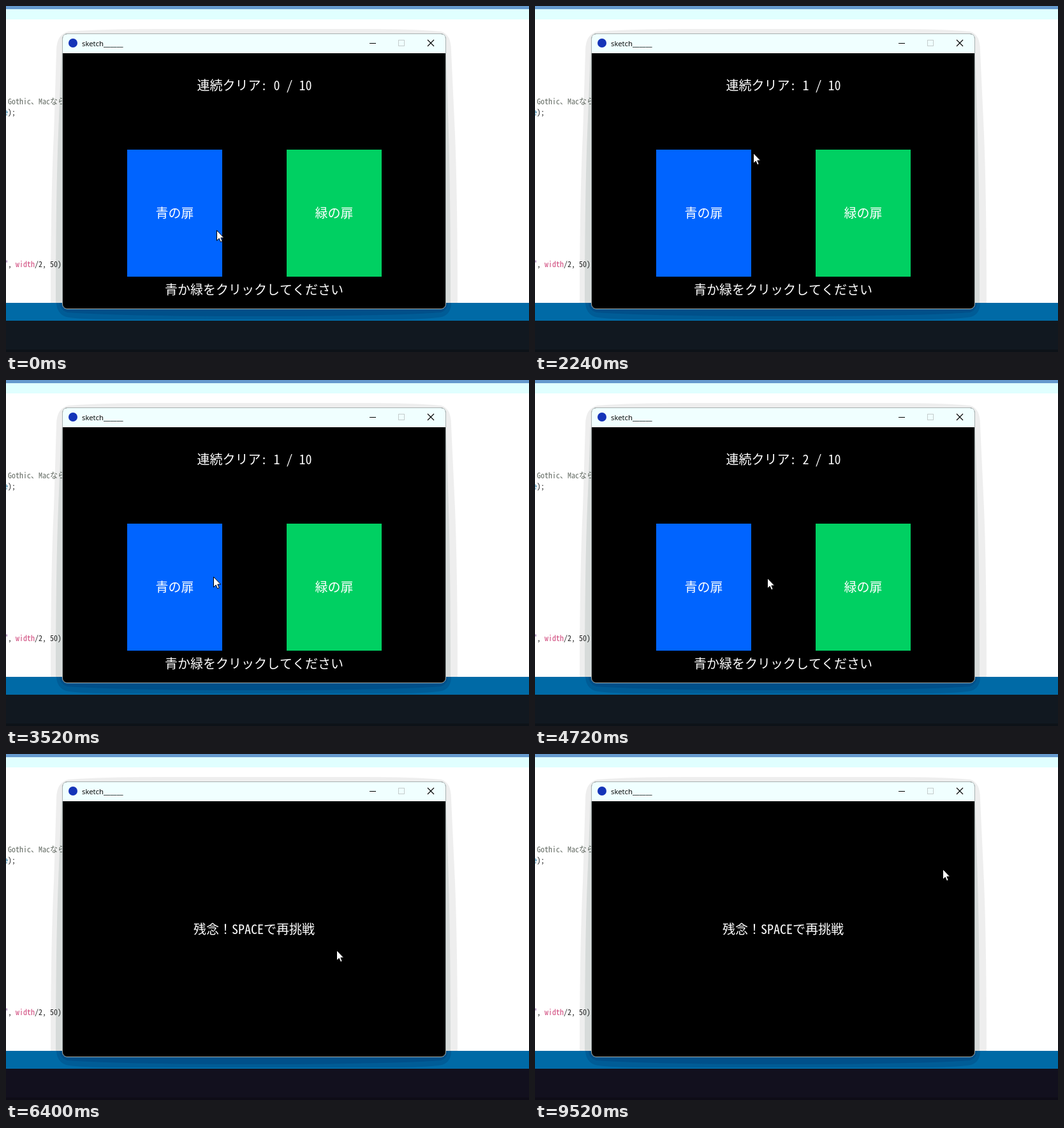
An HTML page for the animation above (9600 ms loop, 820 px wide and 542 px high).

```html
<!DOCTYPE html>
<html lang="ja">
<head>
<meta charset="utf-8">
<title>扉ゲーム</title>
<style>
  html, body { margin: 0; width: 100%; height: 100%; overflow: hidden; background: #fff; }
  svg { display: block; width: 820px; height: 542px; }
  text { white-space: pre; }
  .mono { font-family: "Noto Sans Mono CJK JP", "Noto Sans CJK JP", "Noto Sans CJK", monospace; }
  .game { font-size: 20px; fill: #fff; text-anchor: middle; }
  .code { font-size: 12px; fill: #222; }
  .title { font: 11.4px "Open Sans", "Noto Sans", sans-serif; fill: #000; }
  .sharp { shape-rendering: crispEdges; }
</style>
</head>
<body>
<svg viewBox="0 0 820 542" xmlns="http://www.w3.org/2000/svg">
  <!-- editor behind the window -->
  <g class="sharp">
    <rect width="820" height="542" fill="#fff"/>
    <rect width="820" height="5" fill="#669ace"/>
    <rect y="5" width="820" height="16" fill="#e0ffff"/>
    <rect y="465" width="820" height="28" fill="#006aa6"/>
    <rect id="console" y="493" width="820" height="49"/>
    <rect y="538" width="820" height="4" fill="#000" opacity=".25"/>
  </g>
  <g class="mono code">
    <text x="3" y="154" fill="#606860">Gothic、Macなら</text>
    <text x="-3" y="171"><tspan fill="#006699">e</tspan>);</text>
    <text x="-3" y="409"><tspan fill="#7d4793">"</tspan>, <tspan fill="#d0487c">width</tspan>/2, 50);</text>
  </g>

  <!-- window shadow -->
  <path d="M70 465 Q70 300 75 200 L79 70 Q79 44 98 40 Q150 36 240 36 H560 Q640 36 682 40 Q698 44 698 70 L704 200 Q708 300 708 465 Z" fill="#000" opacity=".065"/>
  <path d="M78 465 Q78 300 82 200 L87 74 H690 L694 200 Q697 300 697 465 Z" fill="#103828" opacity=".1"/>
  <path d="M79 465 H698 Q698 482 684 487 Q660 491 600 491 H180 Q112 491 94 487 Q80 482 79 465 Z" fill="#005c96"/>
  <path d="M84 465 H693 Q693 476 682 480 Q600 486 389 486 Q180 486 96 480 Q84 476 84 465 Z" fill="#00508a"/>

  <!-- window frame -->
  <rect x="88.5" y="43.5" width="601" height="431" rx="7.5" fill="#000" stroke="#a8b0b0"/>
  <path d="M89 74 V51 Q89 44 96 44 H682 Q689 44 689 51 V74 Z" fill="#f0ffff"/>
  <circle cx="105" cy="58" r="7" fill="#1434b8"/>
  <text class="title" x="119" y="63">sketch______</text>
  <g fill="none" stroke="#000">
    <path d="M570 58.5 H580"/>
    <rect x="615.5" y="53.5" width="9" height="9" stroke="#c4cccc"/>
    <path d="M661 53 L671 63 M671 53 L661 63" stroke-width="1.1"/>
  </g>

  <g id="play" class="mono game">
    <g class="sharp">
      <rect x="190" y="225" width="149" height="199" fill="#0064ff"/>
      <rect x="440" y="225" width="149" height="199" fill="#00d062"/>
    </g>
    <text id="score" x="389.5" y="132"></text>
    <text x="264.5" y="332">青の扉</text>
    <text x="514.5" y="332">緑の扉</text>
    <text x="389" y="452">青か緑をクリックしてください</text>
  </g>
  <text id="over" class="mono game" x="389" y="282">残念！SPACEで再挑戦</text>

  <path id="cursor" d="M.5 .5 V16.6 L4.2 13.1 L6.6 18.7 L9.2 17.6 L6.8 12.1 H11.6 Z" fill="#fff" stroke="#000"/>
</svg>
<script>
  const LOOP = 9600, STEP = 80, GAME_OVER = 6240;
  const CLEARS = [1600, 4000, 5440];

  // time, x, y of the pointer tip
  const PATH = [
    [0, 330, 351], [400, 304, 316], [560, 304, 316],
    [1200, 286, 285], [1520, 283, 281], [1680, 283, 281],
    [2240, 342, 230], [2560, 350, 238],
    [3520, 325, 308], [3840, 322, 311], [4480, 322, 311],
    [5280, 518, 307], [8320, 518, 307],
    [8480, 519, 306], [8560, 519, 306], [9520, 639, 180]
  ];

  const el = id => document.getElementById(id);
  const console_ = el('console'), play = el('play'), over = el('over');
  const score = el('score'), cursor = el('cursor');
  const show = (node, on) => node.setAttribute('display', on ? 'inline' : 'none');

  function pointerAt(t) {
    const i = PATH.findIndex(p => p[0] > t);
    if (i < 0) return PATH[PATH.length - 1].slice(1);
    const [t0, x0, y0] = PATH[i - 1], [t1, x1, y1] = PATH[i];
    const u = (t - t0) / (t1 - t0), k = u * u * (3 - 2 * u);
    return [x0 + (x1 - x0) * k, y0 + (y1 - y0) * k].map(Math.round);
  }

  function draw(time) {
    const t = Math.floor((time % LOOP) / STEP) * STEP;
    const lost = t >= GAME_OVER;
    show(play, !lost);
    show(over, lost);
    score.textContent = `連続クリア: ${CLEARS.filter(c => t >= c).length} / 10`;
    console_.setAttribute('fill', lost ? '#12101e' : '#111820');
    cursor.setAttribute('transform', `translate(${pointerAt(t)})`);
  }

  const start = performance.now();
  function tick() {
    draw(performance.now() - start);
    requestAnimationFrame(tick);
  }
  tick();
</script>
</body>
</html>
```
